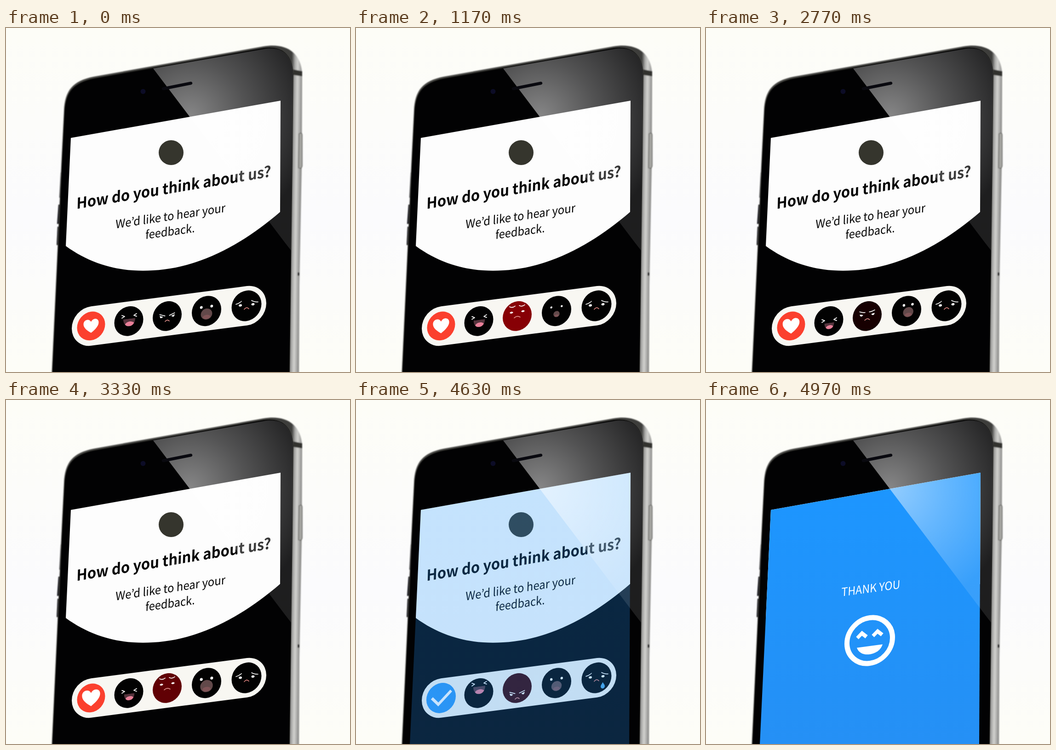
These frames come from a looping animation (748x748 px, 5.01 s). An HTML page:

```html
<!DOCTYPE html>
<html lang="en">
<head>
<meta charset="utf-8">
<title>Feedback phone</title>
<style>
  html, body { margin: 0; width: 100%; height: 100%; overflow: hidden; background: #fff; }
  svg { display: block; width: 100vw; height: 100vh; }
  text { font-family: "Noto Sans CJK JP", "Noto Sans CJK SC", "Noto Sans CJK", "Noto Sans", sans-serif; }
  .line { fill: none; stroke: #fff; stroke-linecap: round; stroke-linejoin: round; }
  .sharp { stroke-linecap: butt; stroke-linejoin: miter; }
</style>
</head>
<body>
<svg viewBox="0 0 748 748" xmlns="http://www.w3.org/2000/svg">
  <defs>
    <linearGradient id="backdrop" x2="0" y2="1">
      <stop offset="0" stop-color="#fdfdf7"/>
      <stop offset=".55" stop-color="#fbfbfd"/>
      <stop offset="1" stop-color="#fdfdf7"/>
    </linearGradient>
    <linearGradient id="metal" gradientUnits="userSpaceOnUse" x1="621" y1="100" x2="645" y2="100.3">
      <stop offset="0" stop-color="#3c3c3a"/>
      <stop offset=".3" stop-color="#a9a9a7"/>
      <stop offset=".55" stop-color="#d2d2cf"/>
      <stop offset=".8" stop-color="#a8a8a6"/>
      <stop offset="1" stop-color="#858583"/>
    </linearGradient>
    <radialGradient id="shine" gradientUnits="userSpaceOnUse" cx="400" cy="190" r="270">
      <stop offset="0" stop-color="#fff" stop-opacity=".52"/>
      <stop offset=".45" stop-color="#fff" stop-opacity=".32"/>
      <stop offset="1" stop-color="#fff" stop-opacity=".11"/>
    </radialGradient>
    <linearGradient id="blue" x2="0" y2="1">
      <stop offset="0" stop-color="#1c96ff"/>
      <stop offset="1" stop-color="#2590f5"/>
    </linearGradient>
    <filter id="soft"><feGaussianBlur stdDeviation="1"/></filter>
    <clipPath id="laugh"><path d="M-13 0H13C13 9 8 16 0 16S-13 9-13 0Z"/></clipPath>
  </defs>

  <rect width="748" height="748" fill="url(#backdrop)"/>

  <!-- phone body -->
  <g filter="url(#soft)">
    <path fill="#17171c" d="M119 314h5v55h-8zM114 384h6l-3 42h-6zM112 432h5l-2 40h-5z"/>
    <path fill="url(#metal)" d="M99 760L112 480 120 300 126 180C128 135 146 115 190 106L560 40C605 32 642 50 644 100L643 300 638 560 637 760Z"/>
    <path fill="#33332f" d="M624 90L644 94V105L624 102Z"/>
    <path fill="#a4a4a0" stroke="#62625e" stroke-width="1.5" d="M637 230Q643 226 644 232V300Q642 308 636 304Z"/>
    <ellipse cx="636" cy="535" rx="2" ry="4" fill="#222"/>
  </g>
  <path fill="#020203" stroke="#161614" stroke-width="1.5" d="M101 760L114 480 122 300 128 182C130 138 148 119 192 110L560 44C600 38 622 58 624 100L622 300 616 760Z"/>
  <circle cx="298" cy="138" r="5.5" fill="#0c0c26"/>

  <!-- survey -->
  <path fill="#fdfdfd" d="M141 239L597 158 596 400C515 470 420 522 320 527C270 530 200 525 130 474Z"/>
  <circle cx="359" cy="271" r="27" fill="#35352d"/>
  <g fill="#050505">
    <text transform="matrix(.95 -.158 -.03 1 153 393.5)" font-size="32.7" font-weight="700">How do you think about us?</text>
    <g font-size="25.4">
      <text transform="matrix(.943 -.142 -.03 1 238 436)">We’d like to hear your</text>
      <text transform="matrix(.93 -.13 -.03 1 303 459)">feedback.</text>
    </g>
  </g>

  <!-- reactions -->
  <g transform="matrix(1 -.13 0 1.02 354 626)">
    <path d="M-169 0H170" stroke="#f8f7f2" stroke-width="84" stroke-linecap="round"/>

    <g transform="translate(-169 0)">
      <g id="love">
        <circle r="30.5" fill="#fb402e"/>
        <path id="heart" fill="#fff" d="M0 15C-9 9-17 2-17-6C-17-16-4-18 0-9C4-18 17-16 17-6C17 2 9 9 0 15Z"/>
      </g>
      <g id="done">
        <circle r="32" fill="#2c96f4"/>
        <path id="tick" class="line sharp" d="M-20-2L-6 13L22-13" stroke-width="6" pathLength="1" stroke-dasharray="1 2"/>
      </g>
    </g>

    <g transform="translate(-87 0)">
      <circle r="31.5" fill="#020202"/>
      <g id="hahaFace">
        <path class="line" stroke-width="1.7" d="M-15-14L-9-11L-15-8M17-14L11-11L17-8"/>
        <g id="hahaMouth">
          <g clip-path="url(#laugh)">
            <rect x="-14" y="-1" width="28" height="18" fill="#55343d"/>
            <ellipse cx="1" cy="14" rx="11" ry="8" fill="#e87f98"/>
          </g>
        </g>
      </g>
    </g>

    <g transform="translate(-3.5 0)">
      <circle id="angrySkin" r="31.5"/>
      <g id="angryFace">
        <path class="eye" fill="#fff"/>
        <path class="eye" fill="#fff"/>
        <path class="brow line" stroke-width="1.7"/>
        <path class="brow line" stroke-width="1.7"/>
        <path id="angryMouth" class="line" style="stroke:#dc8d89" stroke-width="1.7"/>
      </g>
    </g>

    <g transform="translate(82 0)">
      <circle r="32" fill="#020202"/>
      <g id="wowFace">
        <circle class="wowEye" fill="#fff"/>
        <circle class="wowEye" fill="#fff"/>
        <g id="wowMouth">
          <circle r="1" fill="#62494a"/>
          <ellipse cy=".52" rx=".66" ry=".38" fill="#805457"/>
        </g>
      </g>
    </g>

    <g transform="translate(169 0)">
      <circle r="32.5" fill="#020202"/>
      <g id="sadFace">
        <path class="line" stroke-width="1.6" d="M-23-6Q-16-7-11-11M11-10Q17-6 25-5"/>
        <ellipse cx="-13.5" cy="-2.5" rx="3.5" ry="2.5" fill="#fff"/>
        <ellipse cx="14" cy="-1.5" rx="3.5" ry="2.5" fill="#fff"/>
        <path id="sadMouth" class="line" style="stroke:#d9817c" stroke-width="1.7" d="M-5 3Q0-3 5 3"/>
      </g>
      <path id="tear" fill="#4fa9e6" d="M0-7C2-3 4.5-1 4.5 2A4.5 4.5 0 0 1-4.5 2C-4.5-1-2-3 0-7Z"/>
    </g>
  </g>

  <!-- thank-you screen -->
  <path id="cover" fill="url(#blue)" d="M141 239L597 158 594 750H117Z"/>
  <g id="thanks">
    <text transform="matrix(.93 -.125 -.04 1 294 427)" font-size="25" fill="#fff">THANK YOU</text>
    <g transform="matrix(1 -.13 0 1 356 523)">
      <circle class="line" r="49.5" stroke-width="11"/>
      <path class="line sharp" stroke-width="8" d="M-27-9L-17-18L-7-9M7-9L17-18L27-9"/>
      <path fill="#fff" d="M-28 12H28C24 24 13 30 0 30S-24 24-28 12Z"/>
    </g>
  </g>

  <path fill="url(#shine)" d="M320 88L560 46C600 39 622 58 624 100L620 484 606 466Z"/>
  <path d="M342 132L402 120" stroke="#09090f" stroke-width="6.5" stroke-linecap="round"/>
</svg>

<script>
const LOOP = 5010;
const ANGRY_CYCLE = 2450;
const WOW_CYCLE = 4400;
const TEAR_CYCLE = 760;

const $ = id => document.getElementById(id);
const move = (id, value) => $(id).setAttribute('transform', value);
const show = (id, opacity) => $(id).setAttribute('opacity', opacity);
const ramp = (t, from, to) => Math.min(1, Math.max(0, (t - from) / (to - from)));
const ease = (t, from, to) => { const x = ramp(t, from, to); return x * x * (3 - 2 * x); };
const bump = x => Math.sin(Math.PI * x);

// Calls draw(element, side) with side -1 for the left part and 1 for the right.
const eachSide = (selector, draw) =>
  document.querySelectorAll(selector).forEach((el, i) => draw(el, i ? 1 : -1));

function drawLove(t) {
  const press = 1 + .2 * bump(ramp(t, 4150, 4450));
  move('heart', `scale(${.97 + .25 * bump(t / 1000) ** 2})`);
  move('love', `scale(${press})`);
  move('done', `scale(${press})`);
  show('done', ramp(t, 4260, 4340));
  $('tick').setAttribute('stroke-dashoffset', 1 - ramp(t, 4300, 4500));
}

function drawHaha(t) {
  const y = 9 * ease(t, 900, 1700) - 10 * ease(t, 3100, 3800) - 8 * ease(t, 4000, 4500);
  move('hahaFace', `translate(0 ${y})`);
  move('hahaMouth', `translate(1 -5) scale(${1 - .02 * Math.max(0, y)})`);
}

function drawAngry(t) {
  const p = t % ANGRY_CYCLE;
  const rage = ramp(p, 150, 1700) * (1 - ease(p, 2050, 2250));
  const worry = ease(p, 0, 800) - ease(p, 1500, 1750);
  const lowered = ease(p, 1600, 1950) - ease(p, 2250, ANGRY_CYCLE);
  const frown = 1 - worry;
  const red = Math.round(205 * rage);

  $('angrySkin').setAttribute('fill', `rgb(${red},0,${Math.round(red * .04)})`);
  move('angryFace', `translate(0 ${12 * lowered - 8 * worry})`);
  eachSide('.eye', (eye, side) => {
    eye.setAttribute('d', `M-4 0Q0 ${-4 * worry} 4 0Q0 ${4 + 4 * frown}-4 0Z`);
    eye.setAttribute('transform', `translate(${12.5 * side} -1) rotate(${-20 * side * frown})`);
  });
  eachSide('.brow', (brow, side) => {
    brow.setAttribute('d', `M-6 0Q0 ${4 * worry} 6 0`);
    brow.setAttribute('transform', `translate(${10.5 * side} ${-3 - 11 * worry}) rotate(${-20 * side * frown})`);
  });
  const half = 4.5 + 2 * worry;
  $('angryMouth').setAttribute('d', `M${-half} 11Q0 6 ${half} 11`);
}

function drawWow(t) {
  const gape = 10.3 + 3.9 * Math.cos(2 * Math.PI * (t - 3700) / WOW_CYCLE);
  const turn = ease(t, 1500, 2000) - ease(t, 2350, 3100);
  move('wowFace', `translate(${9 * turn} ${-9 * turn})`);
  eachSide('.wowEye', (eye, side) => {
    eye.setAttribute('cx', side * (11.3 - 5 * turn));
    eye.setAttribute('cy', -9);
    eye.setAttribute('r', 1.3 + gape * .13);
  });
  move('wowMouth', `translate(0 6.5) scale(${gape} ${gape * .94})`);
}

function drawSad(t) {
  const droop = ease(t, 3200, 3700) - ease(t, 4000, 4600);
  move('sadFace', `translate(0 ${3.5 * droop})`);
  move('sadMouth', `translate(0 ${4 + droop})`);

  // One tear falls on the left, then one on the right, at the end of the loop.
  const tears = Math.max(0, (t - LOOP) / TEAR_CYCLE + 2);
  const fall = tears % 1;
  move('tear', `translate(${tears < 1 ? -13 : 13.5} ${4 + 28 * fall}) scale(${bump(fall)})`);
}

function render(t) {
  [drawLove, drawHaha, drawAngry, drawWow, drawSad].forEach(draw => draw(t));
  show('cover', ramp(t, 4530, 4930));
  show('thanks', ramp(t, 4760, 4950));
}

const start = performance.now();
function tick() {
  render((performance.now() - start) % LOOP);
  requestAnimationFrame(tick);
}
tick();
</script>
</body>
</html>
```
